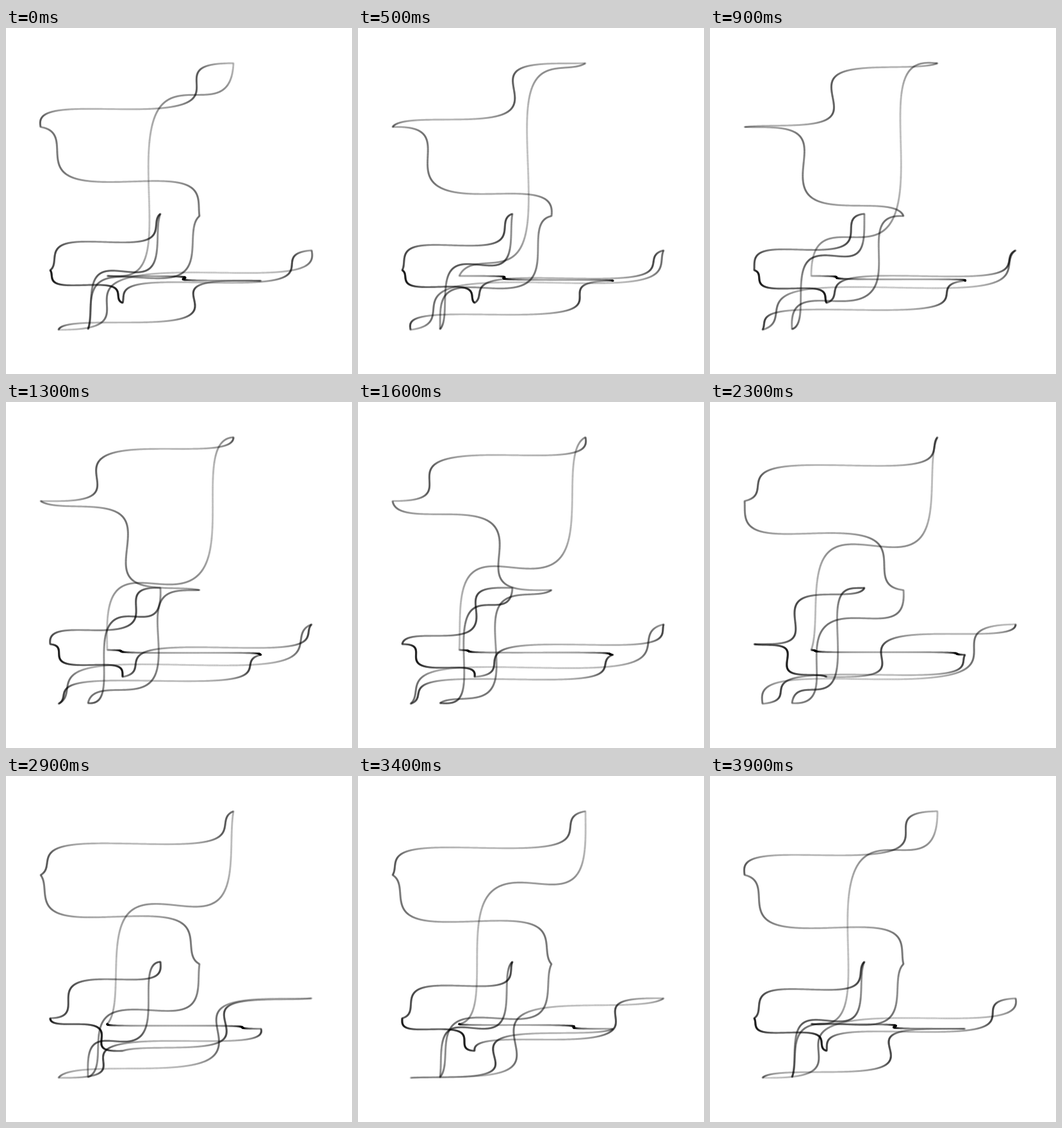
An HTML page with a canvas that plays this animation: 540 by 540 pixels, repeating every 4000 ms.

```html
<!DOCTYPE html>
<html lang="en">
<head>
<meta charset="utf-8">
<title>Wandering loop</title>
<style>
  html, body { margin: 0; height: 100%; overflow: hidden; background: #fff; }
  canvas { display: block; }
</style>
</head>
<body>
<canvas id="stage" width="540" height="540"></canvas>
<script>
const ctx = document.getElementById('stage').getContext('2d');
const LOOP = 4000, STEP = 100;
const DOTS = 600, RADIUS = 1.7, ALPHA = 0.1;
const TAU = 2 * Math.PI;

// The closed path visits these fixed points in order.
const anchors = [
  [241, 290], [69, 378], [182, 429], [477, 347], [82, 471], [398, 394.5],
  [158, 387], [355, 55], [54, 154.5], [302, 293.5], [128, 470]
];

// Progress 0..1 bent by a travelling wave that fades out at both ends.
function bend(p, phase) {
  const fade = 1 - Math.abs(2 * p - 1) ** 3;
  return p - 0.19 * fade * Math.sin(TAU * (0.95 * (p - 0.5) - phase + 0.5));
}

// x and y run half a wave apart, so the link moves in soft stairs.
function drawLink(from, to, cycle) {
  const phase = cycle - 0.1 * Math.sin(TAU * cycle);
  for (let i = 0; i < DOTS; i++) {
    const p = i / DOTS;
    const x = from[0] + (to[0] - from[0]) * bend(p, phase);
    const y = from[1] + (to[1] - from[1]) * bend(p, phase + 0.5);
    ctx.beginPath();
    ctx.arc(x, y, RADIUS, 0, TAU);
    ctx.fill();
  }
}

function draw(time) {
  ctx.fillStyle = '#fff';
  ctx.fillRect(0, 0, 540, 540);
  ctx.fillStyle = `rgba(0, 0, 0, ${ALPHA})`;
  anchors.forEach((from, i) =>
    drawLink(from, anchors[(i + 1) % anchors.length], time / LOOP - i / 10));
}

let shown = -1;
function tick() {
  const time = Math.floor(performance.now() % LOOP / STEP) * STEP;
  if (time !== shown) draw(shown = time);
  requestAnimationFrame(tick);
}
tick();
</script>
</body>
</html>
```
